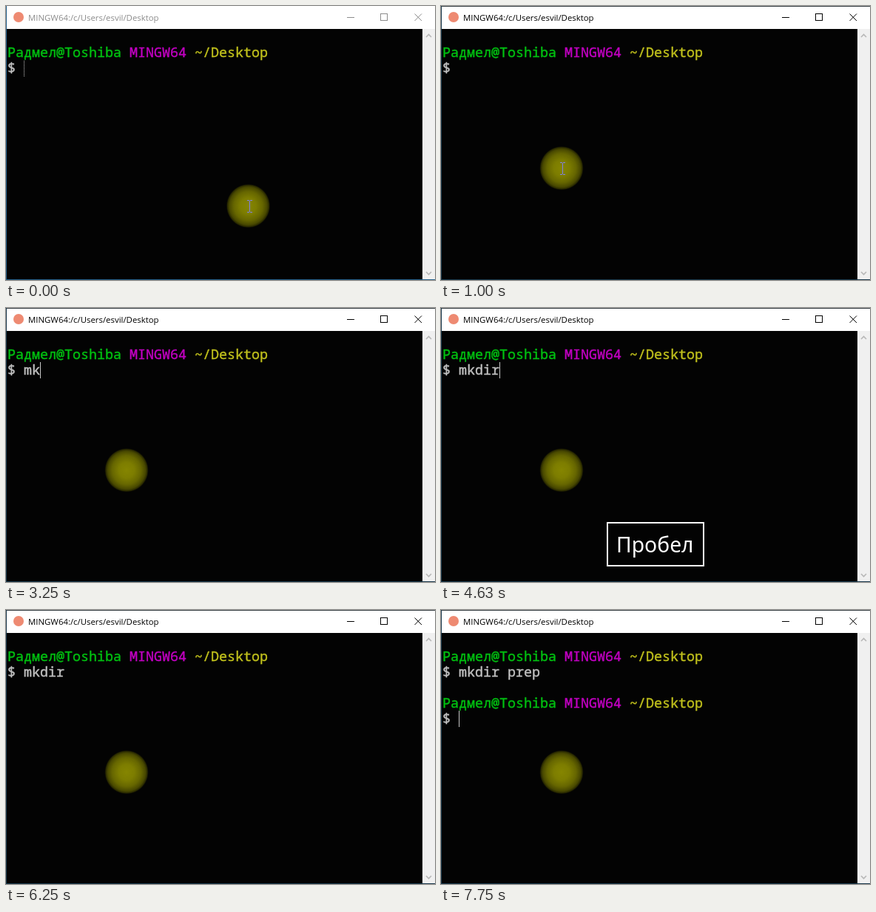
Write an HTML page with a canvas that moves like this. It is 580 px wide and 370 px high and loops after 8000 ms.

```html
<!DOCTYPE html>
<html lang="ru">
<head>
<meta charset="utf-8">
<title>Terminal</title>
<style>
  html, body { margin: 0; width: 100%; height: 100%; overflow: hidden; background: #030303; }
  canvas { display: block; }
</style>
</head>
<body>
<canvas id="stage" width="580" height="370"></canvas>
<script>
const ctx = document.getElementById('stage').getContext('2d');
const LOOP = 8000, CELL = 11, ROW = 21, LEFT = 2, BASELINE = 69;
const MONO = '18.333px "Noto Sans Mono", monospace';
const PROMPT = [['Радмел@Toshiba', '#00be10'], ['MINGW64', '#bf00bf'], ['~/Desktop', '#bfbf1c']];
const FOCUS_AT = 380, HIDE_BEAM_AT = 2750, KEY = [4630, 5750], ENTER_AT = 7380, DONE_AT = 7750;

// Each list holds [start time, value]; a value stays until the next one.
const POINTER = [[0, [327.5, 270]], [250, [190, 214]], [380, [115, 188]], [630, [139, 203]], [750, [163, 219]]];
const TYPED = [[0, ''], [2750, 'm'], [3000, 'mk'], [3630, 'mkd'], [4000, 'mkdi'], [4250, 'mkdir'],
  [4750, 'mkdir '], [6750, 'mkdir p'], [7000, 'mkdir pre'], [7250, 'mkdir prep']];
const CARET = [[0, true], [1000, false], [1250, true], [1630, false], [2000, true], [2380, false],
  [2630, true], [4380, false], [4630, true], [5250, false], [5750, true], [6250, false], [6750, true]];

const valueAt = (list, t) => list.filter(([start]) => start <= t).pop()[1];

function rect(x, y, w, h, color) {
  ctx.fillStyle = color;
  ctx.fillRect(x, y, w, h);
}

function text(str, x, y, font, color) {
  ctx.font = font;
  ctx.fillStyle = color;
  ctx.fillText(str, x, y);
}

function polyline(points, color, width = 1) {
  ctx.beginPath();
  points.forEach(([x, y]) => ctx.lineTo(x, y));
  ctx.strokeStyle = color;
  ctx.lineWidth = width;
  ctx.stroke();
}

function outline(x, y, w, h, color, width = 1) {
  ctx.strokeStyle = color;
  ctx.lineWidth = width;
  ctx.strokeRect(x, y, w, h);
}

// A thin stroke gives the glyphs a medium weight.
function terminalText(str, col, row, color) {
  const x = LEFT + col * CELL, y = BASELINE + row * ROW;
  text(str, x, y, MONO, color);
  ctx.strokeStyle = color;
  ctx.lineWidth = 0.45;
  ctx.strokeText(str, x, y);
}

function drawPrompt(row, command) {
  let col = 0;
  for (const [part, color] of PROMPT) {
    terminalText(part, col, row, color);
    col += part.length + 1;
  }
  terminalText('$ ' + command, 0, row + 1, '#c0c0c0');
}

function drawCaret(col, row, focused) {
  const x = LEFT + col * CELL, y = 73 + (row - 1) * ROW;
  if (focused) return rect(x, y, 1, 22, '#c6c6c6');
  for (let dy = 1; dy < 22; dy += 2) rect(x, y + dy, 1, 1, '#c6c6c6');
}

function drawWindow(focused) {
  const ink = focused ? '#000' : '#8c8c8c';
  const edge = focused ? '#19394c' : '#24608a';
  rect(0, 0, 580, 31, '#fff');
  ctx.beginPath();
  ctx.arc(17, 15, 7, 0, 7);
  ctx.fillStyle = '#ee8a72';
  ctx.fill();
  text('MINGW64:/c/Users/esvil/Desktop', 30, 20, '11.4px "Open Sans", sans-serif', ink);
  rect(461, 15, 10, 1, ink);
  outline(506.5, 10.5, 9, 9, ink);
  polyline([[552.5, 10.5], [562, 20]], ink);
  polyline([[562, 10.5], [552.5, 20]], ink);

  rect(563, 31, 17, 339, '#f0f0f0');
  polyline([[568, 42], [571.5, 38.5], [575, 42]], '#b8b8b8', 1.6);
  polyline([[568, 359], [571.5, 362.5], [575, 359]], '#b8b8b8', 1.6);
  if (focused) rect(0, 0, 580, 1, '#3c4448');
  rect(0, 0, 1, 370, edge);
  rect(0, 369, 580, 1, edge);
}

function drawPointer([x, y], beam, clicked) {
  const glow = ctx.createRadialGradient(x, y, 0, x, y, 30);
  glow.addColorStop(0, '#858500');
  glow.addColorStop(0.35, '#7d7d00');
  glow.addColorStop(0.65, '#666600');
  glow.addColorStop(0.85, '#484800');
  glow.addColorStop(0.94, '#282800');
  glow.addColorStop(1, '#03030300');
  rect(x - 30, y - 30, 60, 60, glow);
  if (clicked) {
    ctx.beginPath();
    ctx.arc(x, y, 16.5, 0, 7);
    ctx.strokeStyle = '#f01000';
    ctx.lineWidth = 1.5;
    ctx.stroke();
  }
  if (beam) {
    const bx = Math.round(x + 1), by = Math.round(y - 8);
    const color = '#8080e8';
    rect(bx, by + 1, 1, 15, color);
    for (const dy of [0, 16]) {
      rect(bx - 3, by + dy, 3, 1, color);
      rect(bx + 1, by + dy, 3, 1, color);
    }
  }
}

function drawKey() {
  rect(225, 290, 130, 58, '#030303');
  outline(225, 290, 130, 58, '#fff', 2);
  text('Пробел', 237, 330, '28.3px "Noto Sans", sans-serif', '#fff');
}

function draw(t) {
  const focused = t >= FOCUS_AT;
  const command = valueAt(TYPED, t);
  rect(0, 0, 580, 370, '#030303');
  drawWindow(focused);
  drawPrompt(0, command);
  if (t >= DONE_AT) drawPrompt(3, '');
  drawPointer(valueAt(POINTER, t), t < HIDE_BEAM_AT, t >= FOCUS_AT && t < 630);

  if (valueAt(CARET, t)) {
    if (t >= DONE_AT) drawCaret(2, 4, focused);
    else if (t >= ENTER_AT) drawCaret(0, 2, focused);
    else drawCaret(2 + command.length, 1, focused);
  }
  if (t >= KEY[0] && t < KEY[1]) drawKey();
}

const start = performance.now();
function tick() {
  draw((performance.now() - start) % LOOP);
  requestAnimationFrame(tick);
}
tick();
</script>
</body>
</html>
```
